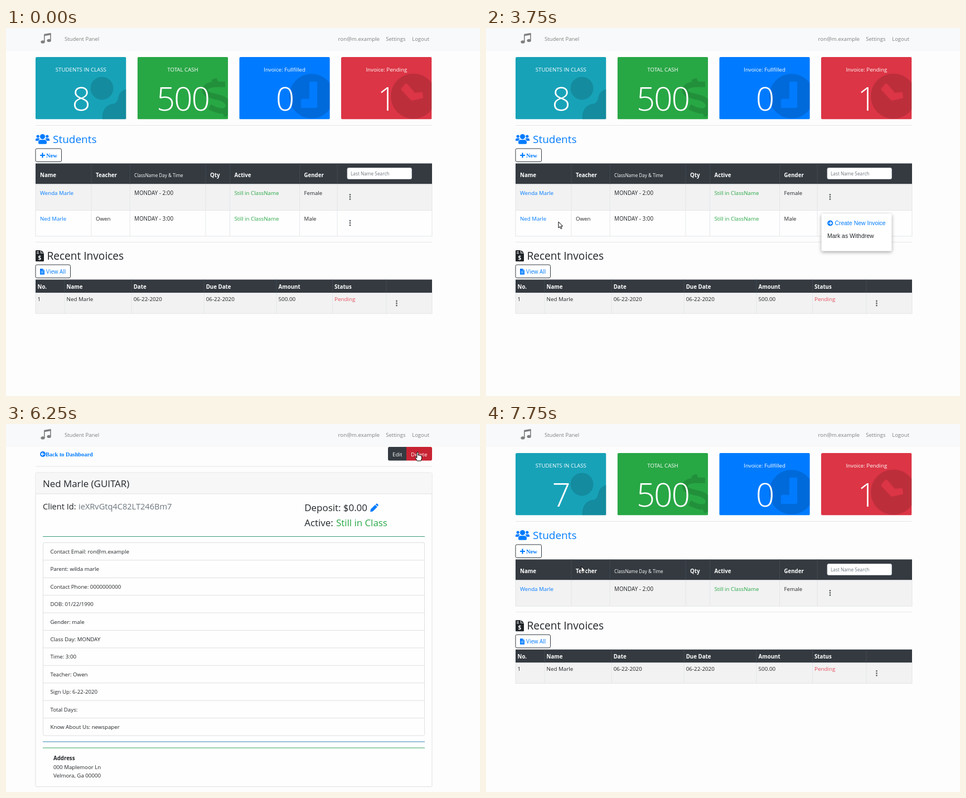
These frames come from a looping animation (850 by 659 pixels, 8 s). An HTML page:

```html
<!DOCTYPE html>
<html lang="en">
<head>
<meta charset="utf-8">
<title>Student Panel</title>
<style>
  html, body { margin: 0; width: 100%; height: 100%; overflow: hidden; background: #fdfdfd; }
  svg { display: block; }
  text { font-family: "Open Sans", "Noto Sans", sans-serif; white-space: pre; }
  .b { font-weight: 700; }
  .light { font-weight: 300; letter-spacing: -.03em; }
  .mid { text-anchor: middle; }
  .serif { font-family: "Liberation Serif", serif; font-weight: 700; }
  .arial { font-family: "Liberation Sans", sans-serif; }
  .u { text-decoration: underline; }
  .menu { filter: drop-shadow(0 2px 3px rgba(0, 0, 0, .35)); }
</style>
</head>
<body>
<svg id="stage" width="850" height="659" viewBox="0 0 850 659"></svg>
<script>
const STEP = 250, LOOP = 8000;
const INK = '#212529', BLUE = '#007bff', GREEN = '#28a745', RED = '#dc3545',
      DARK = '#343a40', GREY = '#7f7f7f', LINE = '#dee2e6', SHADE = 'rgba(0,0,0,.14)';
const MAIL = 'ron@m.example', PUPIL = 'Ned Marle', TEACHER = 'Owen';

// Pointer positions: step, x, y
const PATH = [[2, 700, 515], [3, 690, 487], [5, 630, 362], [6, 616, 352], [11, 615, 355],
  [12, 585, 370], [13, 440, 372], [15, 130, 347], [16, 100, 345], [17, 94, 343],
  [20, 94, 343], [21, 92, 344], [25, 738, 50], [26, 738, 50], [28, 220, 182], [31, 171, 255]];

const text = (x, y, s, fill = INK, size = 9.7, cls = '') =>
  `<text x="${x}" y="${y}" fill="${fill}" font-size="${size}" class="${cls}">${s}</text>`;
const rect = (x, y, w, h, fill, more = '') =>
  `<rect x="${x}" y="${y}" width="${w}" height="${h}" fill="${fill}" ${more}/>`;
const path = (d, fill = 'none', more = '') => `<path d="${d}" fill="${fill}" ${more}/>`;
const circle = (x, y, r, fill) => `<circle cx="${x}" cy="${y}" r="${r}" fill="${fill}"/>`;
const hr = (y, x = 53, w = 711, fill = '#e6e6e6') => rect(x, y, w, 1, fill);
const stroke = (color, w) => `stroke="${color}" stroke-width="${w}"`;
const group = (attrs, s) => `<g ${attrs}>${s}</g>`;
const button = (x, y, w, h) => rect(x + .5, y + .5, w - 1, h - 1, '#fff', 'rx="2.5" ' + stroke(DARK, 1));
const dots = (x, y) => [-4, 0, 4].map(d => circle(x, y + d, 1.4, '#60666b')).join('');

function nav() {
  return rect(0, 0, 850, 41, '#f8f9fa') +
    path('M68.8 25V12M79.9 22.5V10', 'none', stroke(GREY, 1.6)) +
    path('M68 12Q68 11 69 10.8L79.5 8.9Q80.7 8.8 80.7 10V12.2L68 14.6Z', GREY) +
    `<ellipse cx="66" cy="24.9" rx="3.6" ry="2.6" fill="${GREY}"/>` +
    `<ellipse cx="77.1" cy="22.4" rx="3.6" ry="2.6" fill="${GREY}"/>` +
    text(105, 22.5, 'Student Panel', GREY, 9.55) +
    group('text-anchor="end"', text(670, 22.5, MAIL, GREY) +
      text(716.5, 22.5, 'Settings', GREY, 9.5) + text(759, 22.5, 'Logout', GREY, 9.5));
}

function card(x, fill, title, value, icon) {
  return `<svg x="${x}" y="52" width="162.5" height="111.5" viewBox="${x} 52 162.5 111.5">` +
    rect(x, 52, 162.5, 111.5, fill, 'rx="2.5"') + icon +
    text(x + 81.3, 77.5, title, '#fff', 9.7, 'mid') +
    text(x + 81.3, 147.7, value, '#fff', 58, 'mid light') + '</svg>';
}

function cards(count) {
  const user = circle(172, 108, 20.5, SHADE) +
    path('M173 164C171 149 179 138 190 136C197 136 200 131 201 125C203 116 208 111 217 109V164Z', SHADE);
  const dollar = path('M393 101C380 101 361 99 357 109C354 121 372 121 384 125C396 129 404 138 396 146' +
    'C388 152 374 146 365 141M373 91L377 102M392 147L396 158', 'none', stroke(SHADE, 10));
  const nine = circle(548, 122, 40, SHADE) +
    path('M544 98Q544 96 546 96H556Q558 96 558 98V141Q558 143 556 143H531Q529 143 529 141V129Q529 127 531 127H544Z', BLUE);
  const tilted = circle(730.5, 122, 40.5, SHADE) +
    path('M709 108L716 100Q718 99 720 101L733 116L745 115Q747 115 747 117L748 124Q748 126 746 126L729 130Q727 130 725 128L709 111Z', RED);
  return card(53, '#17a2b8', 'STUDENTS IN CLASS', count, user) +
    card(235.7, GREEN, 'TOTAL CASH', 500, dollar) +
    card(418.3, BLUE, 'Invoice: Fullfilled', 0, nine) +
    card(601, RED, 'Invoice: Pending', 1, tilted);
}

// Table frame: header strip plus body rows given as [height, fill]
function grid(y, head, cols, rows) {
  let s = rect(53, y, 711, head, DARK), end = y + head;
  for (const [h, fill] of rows) {
    s += rect(53, end, 711, h, fill) + rect(53, end, 711, .8, LINE);
    end += h;
  }
  for (const x of cols) s += rect(x, y, .8, head, '#454d55') + rect(x, y + head, .8, end - y - head, LINE);
  return s + path(`M53 ${y + head}V${end}H764V${y + head}`, 'none', stroke(LINE, .9));
}

const people = () =>
  circle(57.2, 194, 2.6, BLUE) + circle(73.8, 194, 2.6, BLUE) + circle(65.5, 194.6, 4.6, BLUE) +
  path('M53 202V200Q53 197.6 55.5 197.6H58.6Q60.2 197.6 60.8 198.6Q58.4 200 58 202Z', BLUE) +
  path('M78 202V200Q78 197.6 75.5 197.6H72.4Q70.8 197.6 70.2 198.6Q72.6 200 73 202Z', BLUE) +
  path('M58 206V204.6Q58 200.3 62 200.3H69Q73 200.3 73 204.6V206Q73 207.8 71 207.8H60Q58 207.8 58 206Z', BLUE);

function students(both, hover, focus) {
  const rows = [[46.7, '#f2f2f2']];
  if (both) rows.push([46.7, hover ? '#ececec' : '#fefefe']);
  let s = people() + text(84, 206, 'Students', BLUE, 19) +
    button(52.5, 215.5, 47.5, 24.5) + path('M61 228H70M65.5 223.5V232.5', 'none', stroke(BLUE, 2.2)) +
    text(72, 231.5, 'New', BLUE, 10.5, 'serif') +
    grid(242.5, 37, [152.5, 221.7, 357.7, 401.2, 526.2, 593.7], rows);
  for (const [x, h] of [[61, 'Name'], [161, 'Teacher'], [366, 'Qty'], [409.5, 'Active'], [534.5, 'Gender']])
    s += text(x, 267, h, '#fff', 9.7, 'b');
  s += text(230, 266.7, 'ClassName Day &amp; Time', '#fff', 8.15) +
    rect(612, 250.5, 115.5, 20, '#fff', 'rx="2.5" ' + stroke('#ced4da', .8)) +
    text(618, 264, 'Last Name Search', '#6c757d', 8.3);
  const row = (y, name, teacher, time, gender, on) =>
    text(61, y, name, on ? '#0056b3' : BLUE, 9.7, on ? 'u' : '') + text(161, y, teacher) +
    text(230, y, 'MONDAY - ' + time, INK, 9.9) + text(409.5, y, 'Still in ClassName', GREEN) +
    text(534.5, y, gender) + dots(617, y + 3.8);
  s += row(298.7, 'Wenda Marle', '', '2:00', 'Female');
  if (both) s += row(345.4, PUPIL, TEACHER, '3:00', 'Male', hover === 'link');
  if (focus) s += rect(601.5, 333.5, 32, 32, 'none', stroke('#888', .7) + ' stroke-dasharray="1 1"');
  return s;
}

function invoices(hover) {
  let s = hr(383) +
    path('M53 399Q53 398 54 398H62V403.5H68V417Q68 418 67 418H54Q53 418 53 417ZM63 398L68 402.6H63Z', INK) +
    path('M55 401H59M55 403.6H59', 'none', stroke('#fff', 1)) +
    text(60.4, 415, '$', '#fff', 10, 'mid b') +
    text(73.5, 415, 'Recent Invoices', INK, 19.1) +
    button(52.5, 423.5, 63.5, 24.5) +
    path('M61 431H66V434H69V441.5H61ZM66.6 431L69 433.4H66.6Z', BLUE) +
    path('M62.5 436H67.5M62.5 438.4H67.5', 'none', stroke('#fff', .8)) +
    text(72, 440.2, 'View All', BLUE, 9.9) +
    grid(450.5, 23.7, [104.7, 224.7, 354.7, 484.5, 585, 681.5], [[37, hover ? '#e6e6e6' : '#f2f2f2']]);
  const cells = [[56.5, 'No.', '1'], [108.5, 'Name', PUPIL], [228.7, 'Date', '06-22-2020'],
    [358.7, 'Due Date', '06-22-2020'], [488.5, 'Amount', '500.00'], [589, 'Status', 'Pending']];
  for (const [x, head, value] of cells)
    s += text(x, 466.7, head, '#fff', 9.7, 'b') + text(x, 489, value, value === 'Pending' ? '#e4505f' : INK, 9.8);
  return s + dots(700.5, 493);
}

const arrowDisc = (x, y, dir) => circle(x, y, 5, BLUE) +
  path(`M${x - 3 * dir} ${y}H${x + 2.5 * dir}M${x} ${y - 2.8}L${x + 2.8 * dir} ${y}L${x} ${y + 2.8}`, 'none', stroke('#fff', 1.3));

function menu(opening, fading, hover) {
  const attrs = opening ? 'transform="translate(601.5 334) scale(.952 .915)" opacity=".62"'
    : `transform="translate(601.5 332.5)" opacity="${fading ? .5 : 1}"`;
  return group(attrs, rect(0, 0, 126, 67, '#fff', 'rx="2" class="menu"') +
    (hover ? rect(0, 6, 126, 21, '#f8f9fa') : '') + arrowDisc(15.7, 17, 1) +
    text(24, 20.5, 'Create New Invoice', hover ? '#0056b3' : BLUE, 10.45, hover ? 'arial u' : 'arial') +
    text(10.5, 43.8, 'Mark as Withdrew', INK, 10.45, 'arial'));
}

function detail(hover) {
  let s = arrowDisc(66, 54, -1) + text(71, 57.7, 'Back to Dashboard', BLUE, 10.3, 'serif') +
    path('M718 41H687.5Q685 41 685 43.5V63Q685 65.5 687.5 65.5H718Z', DARK) +
    path('M718 41H761.5Q764 41 764 43.5V63Q764 65.5 761.5 65.5H718Z', hover ? '#c82333' : RED) +
    text(693, 57.7, 'Edit', '#fff', 9.8) + text(726, 57.7, 'Delete', '#fff', 9.8) + hr(75.5) +
    rect(53, 87, 711, 562.5, '#fefefe', 'rx="2.5" ' + stroke('#dfdfdf', 1)) +
    rect(53.5, 87.5, 710, 37, '#f7f7f7') + hr(124.5, 53, 711, '#dfdfdf') +
    text(66, 112.6, PUPIL + ' (GUITAR)', INK, 16.9) +
    text(66, 153, 'Client Id:', INK, 14.6) + text(130, 153, 'ieXRvGtq4C82LT246Bm7', '#6c757d', 14.6) +
    text(535.3, 155.7, 'Deposit: $0.00', INK, 16.9) +
    path('M653.2 157.2L654 152.6L662 144.7L665.8 148.4L657.8 156.4ZM662.8 143.9L664 142.8Q665 142 666 142.9L667.3 144.3Q668.2 145.3 667.4 146.3L666.4 147.5Z', BLUE) +
    text(535.3, 182.7, 'Active:', INK, 16.9) + text(592, 182.7, 'Still in Class', GREEN, 16.9) +
    hr(201, 66, 685, '#3a9c78') +
    rect(66.5, 212.5, 684, 345.5, '#fefefe', 'rx="2.5" ' + stroke('#dfdfdf', 1));
  const facts = ['Contact Email: ' + MAIL, 'Parent: wilda marle', 'Contact Phone: 0000000000',
    'DOB: 01/22/1990', 'Gender: male', 'Class Day: MONDAY', 'Time: 3:00', 'Teacher: ' + TEACHER,
    'Sign Up: 6-22-2020', 'Total Days:', 'Know About Us: newspaper'];
  facts.forEach((f, i) => {
    const y = 212.5 + 31.41 * i;
    if (i) s += hr(y - .5, 66.5, 684, '#dfdfdf');
    s += text(79.5, y + 19.5, f);
  });
  return s + hr(568.5, 66, 685, '#2f86b5') + hr(579.5, 66, 685, '#3aa565') +
    text(85, 602, 'Address', INK, 9.7, 'b') + text(85, 617.5, '000 Maplemoor Ln') +
    text(85, 633, 'Velmora, Ga 00000');
}

// Twelve spokes; the dark one leads clockwise
function spinner(lead) {
  let s = rect(51, 41, 719, 611, '#fefefe');
  for (let i = 0; i < 12; i++) {
    const shade = [1, .88, .66, .48][(lead - i + 12) % 12] || .2;
    s += path('M0 -8.2V-13.4', 'none', stroke('#000', 2.4) +
      ` stroke-linecap="round" opacity="${shade}" transform="translate(408 105) rotate(${i * 30})"`);
  }
  return s;
}

function pointer(n, hand) {
  const j = PATH.findIndex(p => p[0] >= n);
  if (n < PATH[0][0] || j < 0) return '';
  const b = PATH[j], a = PATH[Math.max(0, j - 1)];
  const k = a === b ? 0 : (n - a[0]) / (b[0] - a[0]);
  const shape = hand
    ? 'M-1.2 1Q0 -.8 1.2 1V6L3.2 5.8L4 6.6L5.6 6.4L6.3 7.4L7.6 7.6V11.5L6 16H-.6L-4 10.5Q-4.2 8.8 -2.6 9.2L-1.2 10.8Z'
    : 'M0 0V11L2.5 8.7L4.2 12.6L6 11.8L4.3 8H7.6Z';
  return path(shape, '#fff', stroke('#000', 1) + ' stroke-linejoin="round"' +
    ` transform="translate(${a[1] + (b[1] - a[1]) * k} ${a[2] + (b[2] - a[2]) * k})"`);
}

function scene(n) {
  const within = (a, b) => n >= a && n <= b;
  const onLink = within(18, 20), onMenu = within(9, 11), onDelete = within(25, 26);
  let s = nav();
  if (within(21, 26)) s += detail(onDelete);
  else if (within(27, 28)) s += spinner(n === 28 ? 9 : 6);
  else {
    const both = n < 29;
    s += cards(both ? 8 : 7) + hr(174) +
      students(both, onLink ? 'link' : within(5, 8) && 'row', within(7, 8) || onLink) +
      group(`transform="translate(0 ${both ? 0 : -46.7})"`, invoices(n === 3));
    if (within(9, 17)) s += menu(n === 9, n === 17, onMenu);
  }
  return s + pointer(n, within(6, 11) || onLink || onDelete);
}

const stage = document.getElementById('stage');
let shown = -1;
function tick(now) {
  const n = Math.floor(now % LOOP / STEP);
  if (n !== shown) stage.innerHTML = scene(shown = n);
  requestAnimationFrame(tick);
}
tick(0);
</script>
</body>
</html>
```
